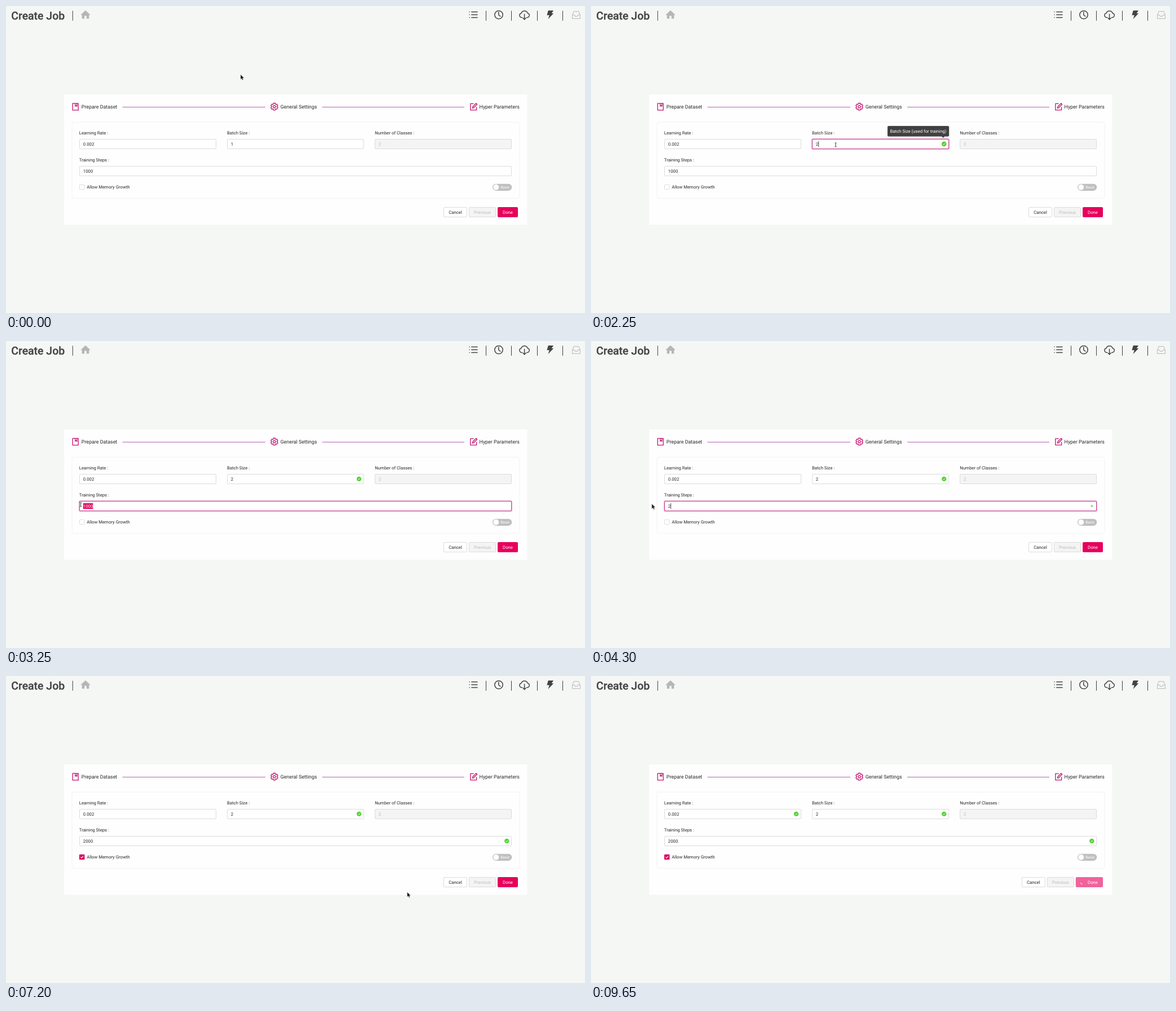
These frames come from a looping animation (1027 px wide and 545 px high, 9700 ms). An HTML page:

```html
<!DOCTYPE html>
<html lang="en">
<head>
<meta charset="utf-8">
<title>Create Job</title>
<style>
  html, body { margin: 0; width: 100%; height: 100%; overflow: hidden; background: #f5f7f5; }
  svg { display: block; width: 1027px; height: 545px; }
  text { font: 7.78px Roboto, sans-serif; fill: #262626; text-rendering: geometricPrecision; white-space: pre; }
  .title { font-size: 19.45px; font-weight: 500; fill: #434343; stroke: #434343; stroke-width: .3; }
  .step { font-size: 8.89px; }
  .mid { text-anchor: middle; }
  .off { fill: #bcbcbc; }
  .white { fill: #fff; }
  .line { fill: none; stroke: #434343; stroke-width: 1.5; stroke-linecap: round; stroke-linejoin: round; }
  .accent { fill: none; stroke: #c2126e; stroke-width: 1.3; stroke-linejoin: round; }
  .box { fill: #fff; stroke: #dcdcdc; }
  .gray { fill: #f4f4f4; }
  .edge { fill: none; stroke: #c74a94; }
  .ring { fill: none; stroke: #d0458f; stroke-opacity: .55; stroke-width: 1.3; }
  .caret { fill: #222; }
</style>
</head>
<body>
<svg viewBox="0 0 1027 545">
  <defs>
    <g id="ok">
      <circle r="4.2" fill="#52d234"/>
      <path d="M-1.9 0l1.4 1.5 2.4-2.9" fill="none" stroke="#fff" stroke-width=".9"/>
    </g>
    <filter id="soft" x="-20%" y="-60%" width="140%" height="240%">
      <feDropShadow dx="0" dy="1.2" stdDeviation="2.2" flood-opacity=".17"/>
    </filter>
  </defs>
  <rect width="1027" height="545" fill="#f5f7f5"/>

  <!-- header -->
  <text class="title" x="9.3" y="24.2">Create Job</text>
  <path d="M118.3 8.5v17.5M851.5 8.5v17.5M896.5 8.5v17.5M942.5 8.5v17.5M987.5 8.5v17.5" stroke="#3c3c3c"/>
  <path d="M141 7.8l8.8 8.2h-2.5v6.6h-4.5v-5h-3.6v5h-4.5V16h-2.5z" fill="#b6b6b6"/>
  <path class="line" stroke-linecap="butt" d="M825.8 10.6h10.2M825.8 15.6h10.2M825.8 20.6h10.2M822 10.6h.1M822 15.6h.1M822 20.6h.1"/>
  <circle class="line" cx="874" cy="15.6" r="7.2"/>
  <path class="line" d="M873.8 11v5l3 2.2"/>
  <path class="line" d="M915.5 20.4h-.9a3.9 3.9 0 0 1-.6-7.7a5.9 5.9 0 0 1 11.2 0a3.9 3.9 0 0 1-.6 7.7h-.9M919.6 14.5v9M917.2 21.4l2.4 2.5 2.4-2.5"/>
  <path d="M961.8 8h9.2l-3.2 4.9h3.4l-9.6 10.3 2.2-7h-4.4z" fill="#434343"/>
  <path class="line" style="stroke:#c2c2c2;stroke-width:1.2" d="M1004.6 16.2l2.6-6.6h8.6l2.6 6.6v6.2h-13.8zh4l1 2.2h3.8l1-2.2h4"/>

  <!-- card and steps -->
  <rect x="103" y="157" width="821.5" height="231.5" rx="1" fill="#fefefe"/>
  <rect x="117" y="206" width="794" height="135.6" rx="4" fill="none" stroke="#f2f2f2"/>
  <path d="M206.5 179.5h253.5M561 179.5h252" stroke="#b662b0" stroke-width="1.2"/>
  <path class="accent" d="M118.2 172.9h10v12h-10zM122.8 173v5l1.5-1.2 1.5 1.2v-5"/>
  <path class="accent" id="gear"/>
  <circle class="accent" cx="476" cy="178.7" r="2.1"/>
  <path class="accent" d="M829.6 173.3h-5.8v11.4h10.8v-5.4M827.3 181.3l.5-2.3 6.1-6.2 1.7 1.7-6.2 6.3z"/>
  <text class="step" x="133.8" y="182.2">Prepare Dataset</text>
  <text class="step" x="486.8" y="182.2">General Settings</text>
  <text class="step" x="839.6" y="182.2">Hyper Parameters</text>

  <!-- form -->
  <text x="129.8" y="228.3">Learning Rate :</text>
  <text x="392" y="228.3">Batch Size :</text>
  <text x="654.3" y="228.3">Number of Classes :</text>
  <text x="129.8" y="276.1">Training Steps :</text>
  <rect class="box" x="130.5" y="236.5" width="242" height="17" rx="1.5"/>
  <rect class="box" x="392.5" y="236.5" width="242" height="17" rx="1.5"/>
  <rect class="box gray" x="654.5" y="236.5" width="242" height="17" rx="1.5"/>
  <rect class="box" x="130.5" y="284.5" width="766" height="17" rx="1.5"/>

  <rect class="ring" data-fade="1000 3000" x="391.8" y="235.8" width="243.4" height="18.4" rx="2"/>
  <rect class="edge" data-fade="860 3000" x="392.5" y="236.5" width="242" height="17" rx="1.5"/>
  <rect class="ring" data-fade="3000 6680" x="129.8" y="283.8" width="767.4" height="18.4" rx="2"/>
  <rect class="edge" data-fade="2720 6680" x="130.5" y="284.5" width="766" height="17" rx="1.5"/>

  <text x="136.8" y="247.8">0.002</text>
  <text x="398.8" y="247.8" id="batch"></text>
  <text class="off" x="661" y="247.8">2</text>
  <rect id="select" y="288" height="10" fill="#e6005c"/>
  <text x="136.8" y="295.8"><tspan id="plain"></tspan><tspan id="picked" class="white"></tspan></text>
  <rect class="caret" id="batchCaret" data-on="1000 1550 1800 2600" y="240" width=".8" height="10"/>
  <rect class="caret" id="trainCaret" data-on="4270 5250 5800 6480" y="288" width=".8" height="10"/>

  <use href="#ok" data-pop="8400" data-at="364,244.9"/>
  <use href="#ok" data-pop="2000" data-at="626.2,244.9"/>
  <use href="#ok" data-pop="4270" data-at="888.3,292.9"/>

  <rect class="box" x="130.5" y="317.2" width="8.4" height="8.4" rx="1"/>
  <rect class="edge" data-on="6340 6680" x="130.5" y="317.2" width="8.4" height="8.4" rx="1"/>
  <g data-on="6680 9700">
    <rect x="130" y="316.7" width="9.4" height="9.4" rx="1.2" fill="#d9005f"/>
    <path d="M132.4 321.3l1.8 1.9 3-3.8" fill="none" stroke="#fff" stroke-width="1.1"/>
  </g>
  <text x="143.2" y="324.2">Allow Memory Growth</text>
  <rect x="863" y="315.7" width="34.3" height="12.2" rx="6.1" fill="#bfbfbf"/>
  <circle cx="869.3" cy="321.8" r="5" fill="#fff"/>
  <text class="white" x="877.2" y="324.2" style="font-size:6.67px">Basic</text>

  <!-- buttons -->
  <g id="side">
    <rect class="box" x="776.5" y="357.5" width="41" height="17" rx="1.5"/>
    <text class="mid" x="797" y="369.2">Cancel</text>
    <rect class="box gray" x="821.5" y="357.5" width="47" height="17" rx="1.5"/>
    <text class="mid off" x="845" y="369.2">Previous</text>
  </g>
  <rect id="done" y="357" height="18" rx="2"/>
  <path id="spin" d="M0 3A3 3 0 0 1-3 0" fill="none" stroke="#fff" stroke-width=".9"/>
  <text class="mid white" x="890" y="369.2">Done</text>

  <g id="tip" filter="url(#soft)">
    <rect x="526" y="213" width="109" height="18.5" rx="1.8" fill="#404040"/>
    <path d="M621.8 231h5.8l-2.9 3z" fill="#404040"/>
    <text class="white" x="530.4" y="224.9">Batch Size (used for training)</text>
  </g>

  <g id="cursor">
    <path id="arrow" d="M0 0v9l2-1.8 1.4 3 1.6-.7-1.4-2.9h2.8z" fill="#141414" stroke="#fff" stroke-width=".5"/>
    <path id="beam" d="M-1.6-3.4q1.6 0 1.6.7v6q0 .7-1.6.7M1.6-3.4Q0-3.4 0-2.7M0 3.3q0 .7 1.6.7" fill="none" stroke="#222" stroke-width=".9"/>
    <path id="hand" d="M-1 1q1-1.4 1.9 0v3.2l3.5.8q1.4.5 1.2 2L5 11H.4L-2.6 7.2q-.3-1.2.8-1.1l.8.8z" fill="#fff" stroke="#1a1a1a" stroke-width=".8" stroke-linejoin="round"/>
  </g>
</svg>
<script>
const LOOP = 9700, DIGIT = 4.37, CLICK = 8350;
const $ = id => document.getElementById(id);
const all = (name, fn) => {
  const list = [...document.querySelectorAll(`[data-${name}]`)].map(el => [el, el.dataset[name].split(' ').map(Number)]);
  return t => list.forEach(([el, times]) => fn(el, times, t));
};
const ramp = (t, start, length) => Math.min(1, Math.max(0, (t - start) / length));
const easeOut = p => 1 - (1 - p) ** 3;
const easeBack = p => 1 + 2.2 * (p - 1) ** 3 + 1.2 * (p - 1) ** 2;
const show = (el, on) => { el.style.display = on ? '' : 'none'; };
const latest = (steps, t) => steps.filter(s => s[0] <= t).pop()[1];

const batchText = [[0, '1'], [1800, ''], [2000, '2']];
const trainText = [[0, '1000'], [4270, '2'], [4400, '20'], [4520, '200'], [4650, '2000']];
const path = [
  [0, 416, 121.5], [450, 416, 121.5], [930, 434, 246.2], [2580, 434, 246.2], [2820, 180, 292.2],
  [3020, 180, 292.2], [3400, 107.8, 289], [5400, 107.8, 289], [5550, 103.3, 271.3], [5770, 103.3, 271.3],
  [6380, 177, 321.7], [6760, 177, 321.7], [7400, 873, 402], [7549, 873, 402], [7550, 923, 404],
  [7680, 923, 404], [8080, 898, 366.7], [8690, 898, 366.7], [9000, 884, 414], [9500, 75, 4], [LOOP, 75, 4]
];

function cursorAt(t) {
  const i = path.findIndex(p => p[0] > t);
  const [a, b] = [path[i - 1], path[i]];
  const p = (t - a[0]) / (b[0] - a[0]), e = p * p * (3 - 2 * p);
  return [a[1] + (b[1] - a[1]) * e, a[2] + (b[2] - a[2]) * e];
}

function shapeAt(x, y) {
  const inside = (l, top, r, bottom) => x >= l && x <= r && y >= top && y <= bottom;
  if (inside(130, 236, 373, 254) || inside(392, 236, 635, 254) || inside(130, 284, 897, 302)) return 'beam';
  if (inside(130, 316, 222, 327) || inside(872, 357, 908, 375)) return 'hand';
  return 'arrow';
}

const switches = all('on', (el, times, t) => show(el, times.filter(s => s <= t).length % 2));
const fades = all('fade', (el, [from, to], t) => {
  el.style.opacity = easeOut(ramp(t, from, 250)) - easeOut(ramp(t, to, 250));
});
const pops = all('pop', (el, [from], t) => {
  show(el, t >= from);
  el.setAttribute('transform', `translate(${el.dataset.at}) scale(${easeBack(ramp(t, from, 300))})`);
});

function drawCursor(x, y, t) {
  show($('cursor'), t < 9520);
  $('cursor').setAttribute('transform', `translate(${x} ${y})`);
  const shape = shapeAt(x, y);
  for (const id of ['arrow', 'beam', 'hand']) show($(id), id === shape);
}

function drawText(x, t) {
  const batch = latest(batchText, t), train = latest(trainText, t);
  const dragging = t > 3020 && t < 4270;
  const count = dragging ? Math.min(4, Math.max(0, Math.round((154.3 - x) / DIGIT))) : 0;
  const cut = train.length - count;
  $('batch').textContent = batch;
  $('plain').textContent = train.slice(0, cut);
  $('picked').textContent = train.slice(cut);
  $('select').setAttribute('x', 136.8 + cut * DIGIT);
  $('select').setAttribute('width', count * DIGIT);
  $('batchCaret').setAttribute('x', 399 + batch.length * DIGIT);
  $('trainCaret').setAttribute('x', 136.9 + train.length * DIGIT);
}

function drawButtons(t) {
  const wide = 12.2 * easeOut(ramp(t, CLICK, 280));
  $('side').setAttribute('transform', `translate(${-wide})`);
  $('done').setAttribute('x', 872 - wide);
  $('done').setAttribute('width', 36 + wide);
  $('done').setAttribute('fill', latest([[0, '#e6005c'], [8020, '#e8126b'], [CLICK, '#f0629c']], t));
  show($('spin'), t >= CLICK);
  $('spin').setAttribute('transform', `translate(871.6 366.8) rotate(${(t - 9650) * .36})`);
}

function drawTip(t) {
  const p = easeOut(ramp(t, 940, 110)) - ramp(t, 2660, 110);
  show($('tip'), p > 0);
  $('tip').style.opacity = p;
  const s = .8 + .2 * p;
  $('tip').setAttribute('transform', `translate(624.7 235) scale(${s}) translate(-624.7 -235)`);
}

function render(t) {
  const [x, y] = cursorAt(t);
  switches(t);
  fades(t);
  pops(t);
  drawText(x, t);
  drawButtons(t);
  drawTip(t);
  drawCursor(x, y, t);
}

// six-toothed outline
const teeth = [];
for (let i = 0; i < 6; i++) {
  for (const [turn, r] of [[-23, 4.8], [-15, 6.4], [15, 6.4], [23, 4.8]]) {
    const a = (i * 60 + 30 + turn) * Math.PI / 180;
    teeth.push(`${(476 + r * Math.cos(a)).toFixed(2)} ${(178.7 + r * Math.sin(a)).toFixed(2)}`);
  }
}
$('gear').setAttribute('d', `M${teeth.join('L')}z`);

let start;
function tick(now) {
  start ??= now;
  render((now - start) % LOOP);
  requestAnimationFrame(tick);
}
render(0);
requestAnimationFrame(tick);
</script>
</body>
</html>
```
